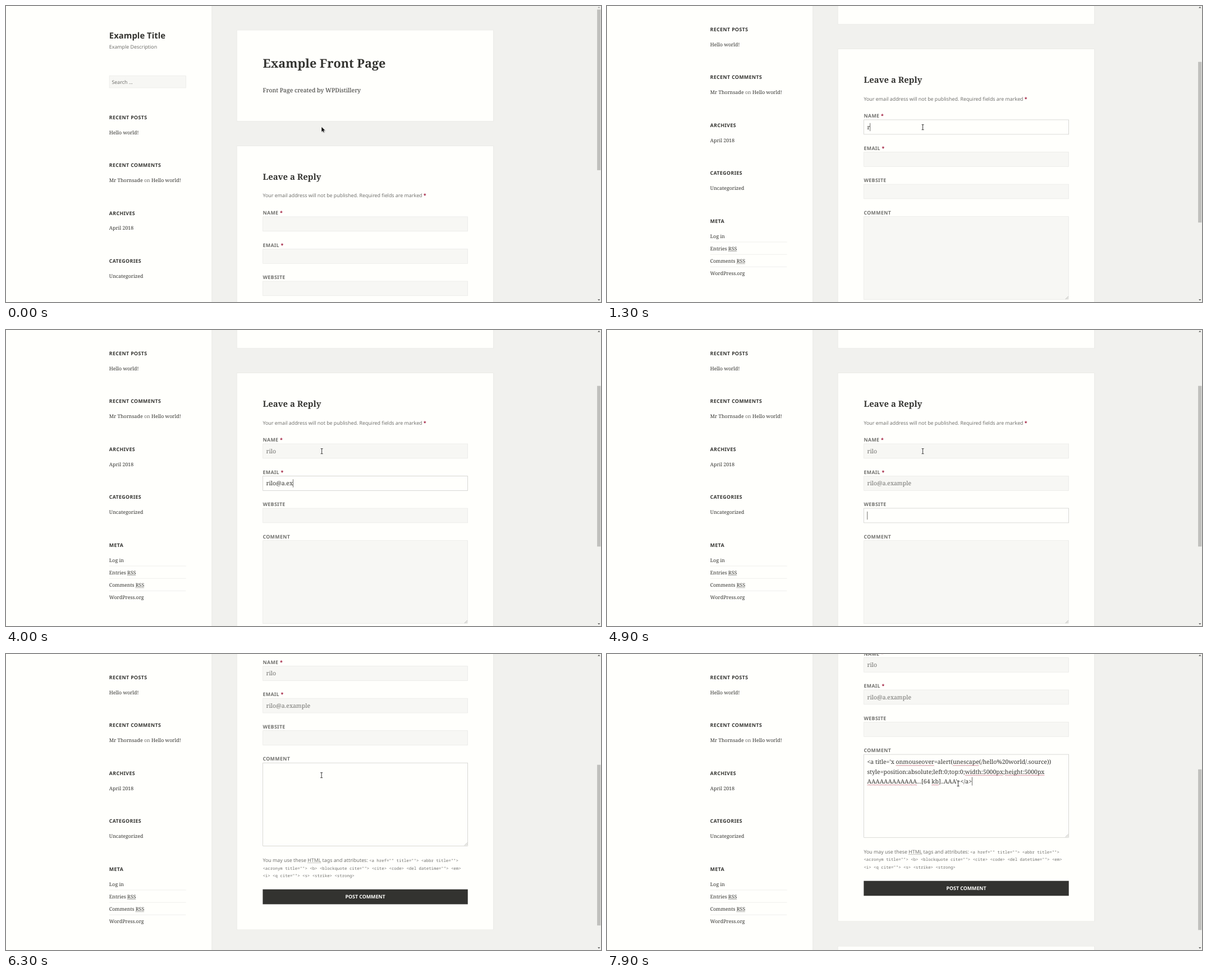
Animation, 1060 px wide and 528 px high, one loop 8 s. Source, as an HTML page with a canvas:

```html
<!DOCTYPE html>
<html lang="en">
<head>
<meta charset="utf-8">
<title>Comment form</title>
<style>
html, body { margin: 0; width: 100%; height: 100%; overflow: hidden; background: #f1f1ee; }
canvas { display: block; }
</style>
</head>
<body>
<canvas id="stage" width="1060" height="528"></canvas>
<script>
const ctx = document.getElementById('stage').getContext('2d');
const LOOP = 8000, STEP = 100;
const S = 0.552; // the page is laid out at 1920px and shown scaled down
const SERIF = '"Noto Serif", serif', SANS = '"Noto Sans", sans-serif', MONO = '"Noto Sans Mono", monospace';
const PAPER = '#fffffc', DESK = '#f1f1ee', INK = '#333330', MUTED = '#71716e';
const FIELD = '#f7f7f4', LINE = '#e4e4e1', FOCUS = '#bdbdba', STAR = '#a01c3c', WAVE = '#c2566a';
const SIDE_X = 183.8, FORM_X = 457.4, FORM_R = 822.7, TEXT_X = 463.5;
const SIDE_LIMIT = 156.9;

const NAME = 'rilo', MAIL = NAME + '@a.example';

const scrollKeys = [
  [0, 0], [100, 7], [200, 29], [300, 59], [400, 89.8], [500, 134], [600, 172.3], [900, 172.9],
  [6000, 173.5], [6100, 225], [6200, 298], [6300, 354.3], [6400, 369.4]
];
const focusKeys = [[0, ''], [1000, 'name'], [1800, 'mail'], [4900, 'site'], [5400, 'comment']];
const nameKeys = [[0, ''], [1300, NAME.slice(0, 1)], [1400, NAME.slice(0, 2)], [1500, NAME.slice(0, 3)], [1800, NAME]];
const mailKeys = [
  [0, ''], [2100, MAIL.slice(0, 1)], [2200, MAIL.slice(0, 2)], [2400, NAME], [2600, NAME + '@'],
  [2800, NAME + '@ex'], [3400, NAME + '@exa'], [3500, NAME + '@ex'], [3600, NAME + '@e'], [3800, NAME + '@'],
  [3900, MAIL.slice(0, 6)], [4000, MAIL.slice(0, 9)], [4100, MAIL.slice(0, 10)],
  [4300, MAIL.slice(0, 11)], [4400, MAIL.slice(0, 12)], [4500, MAIL.slice(0, 13)], [4900, MAIL]
];
const comment = [
  "<a title='x onmouseover=alert(unescape(/hello%20world/.source))",
  'style=position:absolute;left:0;top:0;width:5000px;height:5000px',
  "AAAAAAAAAAAA...[64 kb]..AAA'></a>"
];
const misspelt = [['onmouseover', 'unescape'], ['width:5000px', 'height:5000px'], ['AAAAAAAAAAAA', 'kb']];

function at(keys, t) {
  let value = keys[0][1];
  for (const [time, v] of keys) if (time <= t) value = v;
  return value;
}

function rect(x, y, r, b, color) {
  ctx.fillStyle = color;
  ctx.fillRect(x, y, r - x, b - y);
}

function useFont(size, family, weight = 400, spacing = 0) {
  ctx.font = `${weight} ${size}px ${family}`;
  ctx.letterSpacing = spacing * size + 'px';
  ctx.textRendering = 'geometricPrecision';
}

// Draws with the current font and returns the right end of the text.
function put(str, x, y, color) {
  ctx.save();
  ctx.setTransform(S, 0, 0, S, x, y);
  ctx.fillStyle = color;
  ctx.fillText(str, 0, 0);
  ctx.restore();
  return x + ctx.measureText(str).width * S;
}

function text(str, x, y, size, family, color = INK, weight = 400, spacing = 0) {
  useFont(size, family, weight, spacing);
  return put(str, x, y, color);
}

function stroke(color, width, points, dash = []) {
  ctx.strokeStyle = color;
  ctx.lineWidth = width;
  ctx.setLineDash(dash);
  ctx.beginPath();
  points.forEach(([x, y]) => ctx.lineTo(x, y));
  ctx.stroke();
  ctx.setLineDash([]);
}

function abbr(str, x, y, family, color) {
  const end = text(str, x, y, 16, family, color);
  stroke(color, 0.7, [[x, y + 2], [end, y + 2]], [1.1, 0.8]);
  return end;
}

function box(x, y, r, b, fill, border) {
  rect(x, y, r, b, border);
  rect(x + S, y + S, r - S, b - S, fill);
}

function card(y, b) {
  rect(411.1, y - 0.5, 868.4, b + 0.5, '#e3e3e0');
  rect(411.6, y, 867.9, b, PAPER);
}

function caret(x, y, height) {
  rect(x, y - height / 2, x + 0.7, y + height / 2, INK);
}

function sidebar(top) {
  rect(0, 0, 366.8, 528, PAPER);
  rect(366.5, 0, 367.2, 528, '#e3e3e0');
  const link = (str, y, x = SIDE_X) => text(str, x, y - top, 16, SERIF);
  const heading = (str, y) => text(str, SIDE_X, y - top, 16, SANS, INK, 700, 0.04);

  text('Example Title', SIDE_X, 57.8 - top, 27, SANS, INK, 700);
  text('Example Description', SIDE_X, 75.6 - top, 16, SANS, MUTED);
  box(SIDE_X, 124.3 - top, 320.6, 146.3 - top, FIELD, LINE);
  text('Search …', 188.5, 138.6 - top, 16, SANS, MUTED);

  ['RECENT POSTS', 'RECENT COMMENTS', 'ARCHIVES', 'CATEGORIES', 'META']
    .forEach((str, i) => heading(str, 202 + i * 85.35));
  link('Hello world!', 228.8);
  const end = text(' on ', link('Mr Thornsade', 314), 314 - top, 16, SERIF, MUTED);
  link('Hello world!', 314, end);
  link('April 2018', 399.4);
  link('Uncategorized', 484.8);

  ['Log in', 'Entries ', 'Comments ', 'WordPress.org'].forEach((str, i) => {
    const y = 570.4 + i * 22.07;
    const x = link(str, y);
    if (str.endsWith(' ')) abbr('RSS', x, y - top, SERIF, INK);
    if (i < 3) rect(SIDE_X, y + 7.2 - top, 320.6, y + 7.8 - top, LINE);
  });
}

function label(str, y, required) {
  const x = text(str, FORM_X, y, 16, SANS, MUTED, 700, 0.04);
  if (required) text(' *', x, y, 16, SANS, STAR, 700, 0.04);
}

function input(y, value, focused) {
  box(FORM_X, y, FORM_R, y + 26.5, focused ? PAPER : FIELD, focused ? FOCUS : LINE);
  const end = text(value, TEXT_X, y + 17.1, 19, SERIF, focused ? INK : MUTED);
  if (focused) caret(end, y + 13.3, 14.4);
}

function wave(from, to, y) {
  const points = [];
  for (let x = from; x <= to; x += 0.5) points.push([x, y + 0.45 * Math.sin((x - from) * 2.8)]);
  stroke(WAVE, 0.8, points);
}

function textarea(y, t, focused) {
  const b = y + 148.7;
  box(FORM_X, y, FORM_R, b, focused ? PAPER : FIELD, focused ? FOCUS : LINE);
  for (const d of [5, 2.5]) stroke('#8a8a87', 0.6, [[821.8 - d, b - 1], [821.8, b - 1 - d]]);

  let x = TEXT_X, line = 0;
  if (t >= 6500) {
    useFont(19, SERIF);
    comment.forEach((str, i) => {
      const base = y + 17.6 + i * 17.3;
      x = put(str, TEXT_X, base, INK);
      for (const word of misspelt[i]) {
        const from = TEXT_X + ctx.measureText(str.slice(0, str.indexOf(word))).width * S;
        wave(from, from + ctx.measureText(word).width * S, base + 2.5);
      }
    });
    line = 2;
  }
  const hidden = (t >= 6200 && t < 6500) || (t >= 7000 && t < 7500);
  if (focused && !hidden) caret(x, y + 13.7 + line * 17.3, 15);
}

function allowedTags(y) {
  const code = (str, x, row) => text(str, x, y + row * 13.9, 13.333, MONO, MUTED);
  let x = text('You may use these ', FORM_X, y, 16, SANS, MUTED);
  x = abbr('HTML', x, y, SANS, MUTED);
  x = text(' tags and attributes: ', x, y, 16, SANS, MUTED);
  code('<a href="" title=""> <abbr title="">', x, 0);
  code('<acronym title=""> <b> <blockquote cite=""> <cite> <code> <del datetime=""> <em>', FORM_X, 1);
  code('<i> <q cite=""> <s> <strike> <strong>', FORM_X, 2);
}

function content(top, t) {
  const focus = at(focusKeys, t);
  card(43.3 - top, 205.3 - top);
  text('Example Front Page', FORM_X, 110.2 - top, 39, SERIF, INK, 700);
  text('Front Page created by WPDistillery', FORM_X, 153.8 - top, 19, SERIF);

  card(249.9 - top, 845.9 - top);
  text('Leave a Reply', FORM_X, 310.2 - top, 27, SERIF, INK, 700);
  const x = text('Your email address will not be published. Required fields are marked ',
    FORM_X, 341.4 - top, 16, SANS, MUTED);
  text('*', x, 341.4 - top, 16, SANS, STAR, 700);

  label('NAME', 372.2 - top, true);
  input(375.6 - top, at(nameKeys, t), focus === 'name');
  label('EMAIL', 429.6 - top, true);
  input(433.1 - top, at(mailKeys, t), focus === 'mail');
  label('WEBSITE', 487 - top);
  input(490.6 - top, '', focus === 'site');
  label('COMMENT', 544.4 - top);
  textarea(548.2 - top, t, focus === 'comment');

  allowedTags(724.9 - top);
  rect(FORM_X, 774.1 - top, FORM_R, 800.7 - top, INK);
  useFont(16, SANS, 700);
  const half = ctx.measureText('POST COMMENT').width * S / 2;
  put('POST COMMENT', (FORM_X + FORM_R) / 2 - half, 790.6 - top, PAPER);
  card(890.9 - top, 1100 - top);
}

function triangle(y, dir, color) {
  ctx.fillStyle = color;
  ctx.beginPath();
  ctx.moveTo(1054.1, y);
  ctx.lineTo(1058.5, y);
  ctx.lineTo(1056.3, y + dir * 2.4);
  ctx.fill();
}

function scrollbar(top) {
  rect(1052.4, 0, 1060, 528, DESK);
  const y = 6.3 + top * 0.54;
  rect(1053.1, y, 1059.3, y + 286.6, '#c0c0bd');
  triangle(3.6, -1, top > 0 ? '#4c4c4a' : '#a3a3a0');
  triangle(523.2, 1, '#4c4c4a');
}

function arrowCursor(x, y) {
  ctx.save();
  ctx.translate(x, y);
  ctx.beginPath();
  [[0, 0], [0, 8.2], [1.9, 6.5], [3.2, 9.3], [4.5, 8.7], [3.3, 6], [5.8, 5.8]].forEach(p => ctx.lineTo(...p));
  ctx.closePath();
  ctx.shadowColor = 'rgba(0,0,0,.35)';
  ctx.shadowBlur = 1.5;
  ctx.shadowOffsetX = ctx.shadowOffsetY = 0.6;
  ctx.lineWidth = 1;
  ctx.strokeStyle = '#fff';
  ctx.stroke();
  ctx.shadowColor = 'transparent';
  ctx.fillStyle = '#111';
  ctx.fill();
  ctx.restore();
}

function beamCursor(x, y) {
  for (const [color, width] of [['rgba(255,255,255,.8)', 2.2], ['#3a3a38', 1]]) {
    stroke(color, width, [[x, y - 4.5], [x, y + 4.5]]);
    for (const d of [-4.5, 4.5]) stroke(color, width, [[x - 2, y + d], [x + 2, y + d]]);
  }
}

function pointer(t) {
  if (t < 900) return arrowCursor(562.3, 216);
  const k = Math.min(1, Math.max(0, (t - 6800) / 950));
  const ease = k * k * (3 - 2 * k);
  const x = t < 5400 ? 562.6 : 562.1;
  beamCursor(x + (625.6 - x) * ease, 216.2 + 15 * ease);
}

function draw(t) {
  const top = at(scrollKeys, t);
  rect(0, 0, 1060, 528, DESK);
  sidebar(Math.min(top, SIDE_LIMIT));
  content(top, t);
  scrollbar(top);
  pointer(t);
}

const start = performance.now();
function tick() {
  const t = (performance.now() - start) % LOOP;
  draw(Math.floor(t / STEP) * STEP);
  requestAnimationFrame(tick);
}
tick();
</script>
</body>
</html>
```
